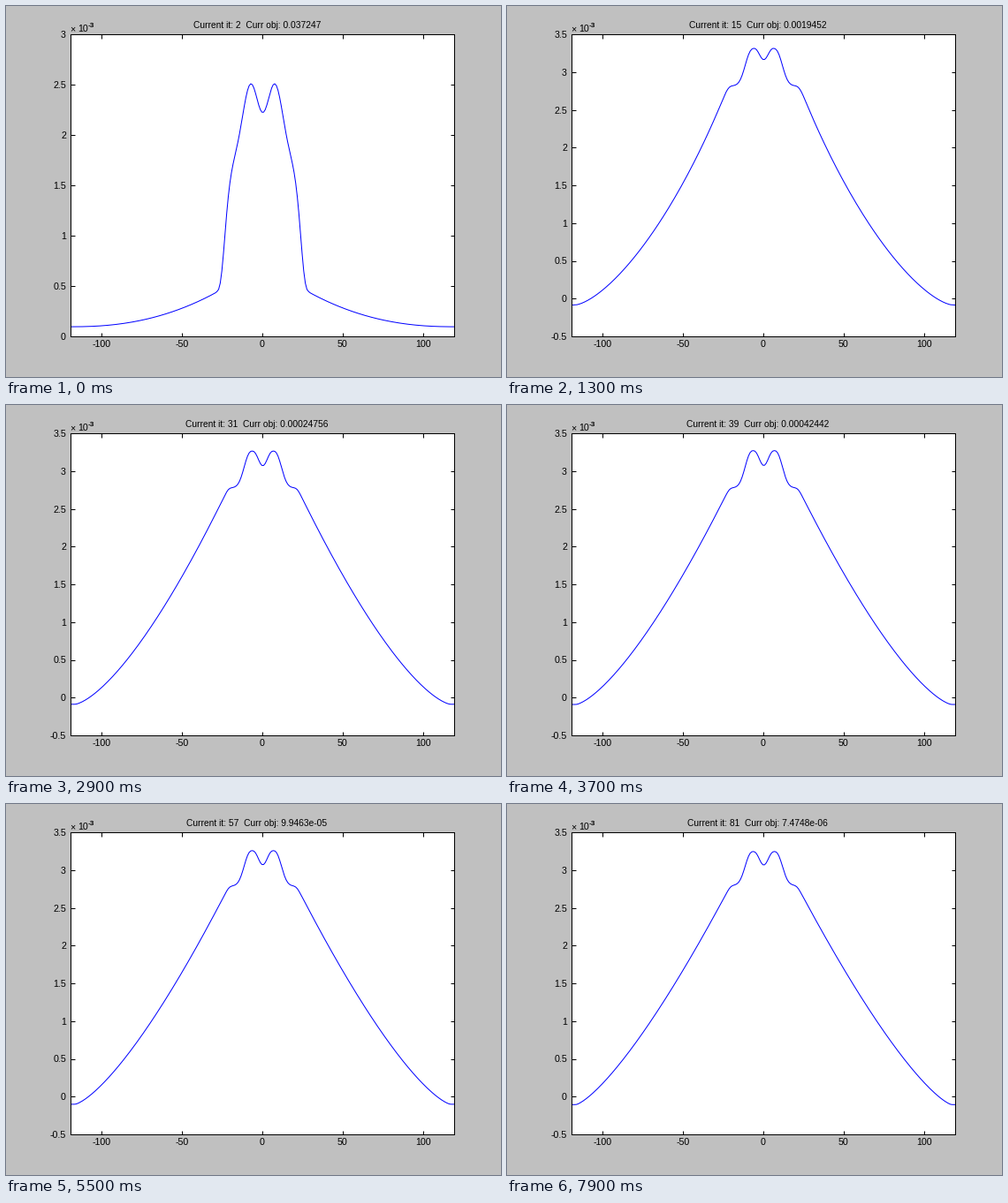
A matplotlib script that plays this animation: 560 px wide and 420 px high, repeating every 8000 ms.

```python
import numpy as np
import matplotlib.pyplot as plt
from matplotlib.animation import FuncAnimation
from matplotlib.ticker import FormatStrFormatter
from matplotlib.transforms import Affine2D

W, H, DPI = 560, 420, 72          # at 72 dpi one point is one pixel
FRAMES, INTERVAL = 80, 100
LEFT, RIGHT, TOP, BOTTOM = 73, 507, 32, 374
XMAX = 119.5

plt.rcParams.update({
    "font.family": "Liberation Sans",
    "font.size": 10.6,
    "axes.unicode_minus": False,
})

x = np.arange(-XMAX, XMAX + 0.5)
r = np.abs(x)


def lobes(height, centre, width, power):
    """Two mirrored bell shapes."""
    return height * (np.exp(-np.abs((r - centre) / width) ** power)
                     + np.exp(-((r + centre) / width) ** power))


def soft_min(a, b, k):
    return -np.log(np.exp(-k * a) + np.exp(-k * b)) / k


def tower():
    tail = 0.1 + 0.345 * ((XMAX - np.maximum(r, 28.5)) / 91) ** 2.3
    return tail + 1.3 * np.exp(-(r / 24) ** 10) + lobes(0.76, 7.5, 7, 2)


def hump():
    skirt = -0.28 + 2.53 * np.exp(-0.029 * (r - 33))
    return soft_min(skirt, 3.03, 20) + lobes(0.325, 0, 11.9, 3.3)


def twin(power, floor, shelf, peak):
    """Twin peaks on a shelf, with a skirt falling to the floor."""
    skirt = floor + (2.67 - floor) * (np.maximum(117 - r, 0) / 93) ** power
    return soft_min(skirt, shelf, 30) + lobes(peak - shelf, 6.7, 6.2, 2.4)


# step, curve, objective
KEYS = [
    (0, tower(), 0.037247),
    (6, hump(), 0.013951),
    (22, twin(1.50, -0.08, 2.785, 3.265), 0.00015447),
    (37, twin(1.42, -0.085, 2.785, 3.275), 0.00042442),
    (46, twin(1.40, -0.09, 2.785, 3.275), 0.00033696),
    (63, twin(1.36, -0.1, 2.805, 3.25), 3.3622e-05),
    (79, twin(1.33, -0.1, 2.805, 3.25), 7.4748e-06),
]


def state(step):
    """Curve and objective at a step; the hump settles quickly."""
    i = next(i for i in range(1, len(KEYS)) if step <= KEYS[i][0])
    (a, c0, o0), (b, c1, o1) = KEYS[i - 1], KEYS[i]
    u = (step - a) / (b - a)
    w = (1 - np.exp(-4 * u)) / (1 - np.exp(-4)) if i == 2 else u
    return c0 + (c1 - c0) * w, o0 * (o1 / o0) ** u


fig = plt.figure(figsize=(W / DPI, H / DPI), dpi=DPI, facecolor="#c0c0c0")
ax = fig.add_axes([LEFT / W, 1 - BOTTOM / H, (RIGHT - LEFT) / W, (BOTTOM - TOP) / H])
ax.set_xlim(-XMAX, XMAX)
ax.set_xticks([-100, -50, 0, 50, 100])
ax.yaxis.set_major_formatter(FormatStrFormatter("%g"))
ax.tick_params(direction="in", length=4.5, width=1, top=True, right=True)
ax.tick_params(axis="x", pad=4.5)
ax.tick_params(axis="y", pad=5)
for spine in ax.spines.values():
    spine.set_linewidth(1)

# half a pixel aligns the curve with the snapped box
curve, = ax.plot(x, KEYS[0][1], color="#0000ff", lw=1,
                 transform=ax.transData + Affine2D().translate(0.5, -0.5))


def label(px, py, s, size, **kw):
    return fig.text(px / W, 1 - py / H, s, size=size, va="baseline", **kw)


title = label(283.7, 25, "", 10.2, ha="center")
label(72, 29, "×", 10.6)
label(81, 29, "10", 10.6)
label(93, 23.5, "-3", 8.2, weight="bold")


def update(n):
    step = 60 if n == 61 else n    # one stalled step
    y, obj = state(step)
    lo, hi = np.floor(y.min() * 2) / 2, np.ceil(y.max() * 2) / 2
    ax.set_ylim(lo, hi)
    ax.set_yticks(np.arange(lo, hi + 0.1, 0.5))
    curve.set_ydata(y)
    title.set_text(f"Current it: {step + 2}  Curr obj: {obj:.5g}")
    return curve, title


anim = FuncAnimation(fig, update, frames=FRAMES, interval=INTERVAL,
                     repeat=True, repeat_delay=0, blit=False)
plt.show()
```
